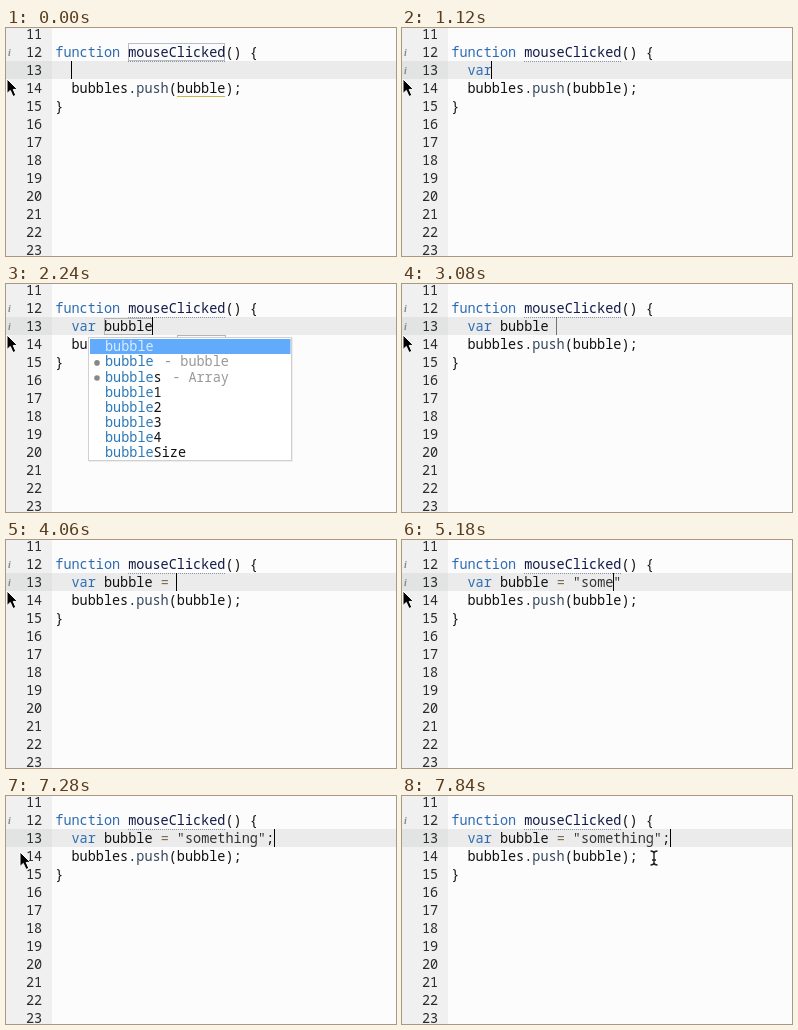
Recreate the animation shown at these times as an HTML page. Size 390 by 228 pixels, loop 8000 ms.

```html
<!DOCTYPE html>
<html lang="en">
<head>
<meta charset="utf-8">
<title>Typing in a code editor</title>
<style>
html, body { margin: 0; width: 100%; height: 100%; overflow: hidden; background: #fcfcfc; }
svg { display: block; width: 100vw; height: 100vh; }
text { font: 500 13.5px "Noto Sans Mono", "DejaVu Sans Mono", monospace; white-space: pre; }
.info { font: italic bold 10px "Liberation Serif", serif; }
</style>
</head>
<body>
<svg id="stage" viewBox="0 0 390 228"></svg>
<script>
const LOOP = 8000, CHAR = 8.1, LEFT = 49.3, LINE = 18;
const BLUE = '#2d6cb3', INK = '#111', NAVY = '#101a48', SLATE = '#34465a', BROWN = '#806a50';

// [time, changes to the editor state]
const STEPS = [
  [0, { code: '', quote: '', caret: 1, fnBox: true, warn: true, info: false,
        popup: null, wordBox: false, mouse: [1, 51] }],
  [140, { caret: 0 }],
  [560, { caret: 1 }],
  [840, { code: 'v', fnBox: false, warn: false, info: true }],
  [980, { code: 'va' }],
  [1120, { code: 'var' }],
  [1400, { code: 'var b', popup: 'words' }],
  [1540, { code: 'var bu' }],
  [1680, { code: 'var bubb' }],
  [1820, { code: 'var bubbl' }],
  [2100, { code: 'var bubble' }],
  [2240, { popup: 'typed', wordBox: true }],
  [2520, { code: 'var bubble ', popup: null }],
  [2660, { wordBox: false }],
  [3080, { caret: 0.5 }],
  [3220, { caret: 0 }],
  [3500, { code: 'var bubble =', caret: 1 }],
  [3780, { code: 'var bubble = ' }],
  [4480, { code: 'var bubble = "', quote: '"' }],
  [4900, { code: 'var bubble = "s' }],
  [5040, { code: 'var bubble = "so' }],
  [5180, { code: 'var bubble = "some' }],
  [5320, { code: 'var bubble = "someth' }],
  [5460, { code: 'var bubble = "somethin' }],
  [5740, { code: 'var bubble = "something' }],
  [6020, { code: 'var bubble = "something"', quote: '' }],
  [6720, { code: 'var bubble = "something";' }],
  [7000, { info: false }],
  [7280, { mouse: [14, 56] }],
  [7420, { mouse: [80, 70] }],
  [7560, { mouse: [168, 74] }],
  [7700, { mouse: [234, 66] }],
  [7840, { mouse: [252, 62] }]
];

const POPUPS = {
  words: [['bubble'], ['bubble1'], ['bubble2'], ['bubble3'], ['bubble4'], ['bubbleSize'], ['bubbles']],
  typed: [['bubble'], ['bubble', 'bubble'], ['bubbles', 'Array'], ['bubble1'], ['bubble2'],
          ['bubble3'], ['bubble4'], ['bubbleSize']]
};

const col = n => LEFT + n * CHAR;
const baseline = row => 29 + (row - 12) * LINE;
const rect = (x, y, w, h, fill, more = '') =>
  `<rect x="${x}" y="${y}" width="${w}" height="${h}" fill="${fill}" ${more}/>`;
const frame = (x, y, w, h, color) => rect(x, y, w, h, 'none', `stroke="${color}"`);
const dots = (x, y, w) =>
  `<path d="M${x} ${y}h${w}" stroke="#8795a8" stroke-dasharray="1 1"/>`;
const span = (s, fill, more = '') => `<tspan fill="${fill}" ${more}>${s}</tspan>`;
const text = (x, y, body, more = '') => `<text x="${x}" y="${y}" ${more}>${body}</text>`;
const info = row => text(2, baseline(row) - 1, 'i', 'class="info" fill="#888"');

function background() {
  let out = rect(0, 0, 390, 228, '#fcfcfc') + rect(0, 0, 46, 228, '#f0f0f0') +
    rect(46, 33, 344, LINE, '#ebebeb') + rect(0, 33, 46, LINE, '#e2e4e4');
  for (let row = 11; row <= 23; row++)
    out += text(36.2, baseline(row), row, 'text-anchor="end" fill="#2a2a2a"');
  return out + info(12);
}

const fixedCode =
  text(col(0), baseline(12), span('function ', BLUE) + span('mouseClicked', NAVY) + span('() {', INK)) +
  text(col(2), baseline(14), span('bubbles.', INK) + span('push', SLATE) + span('(bubble);', INK)) +
  text(col(0), baseline(15), span('}', INK));

function typedLine({ code, quote }) {
  const [, keyword = '', name, equals = '', string = '', end] =
    /^(var\b)?([^="]*)(= ?)?("[^"]*"?)?(.*)$/.exec(code + quote);
  return text(col(2), baseline(13), span(keyword, BLUE) + span(name, INK) +
    span(equals, BROWN) + span(string, '#333') + span(end, INK));
}

function popup(name, typed) {
  const items = POPUPS[name], height = items.length * 15 + 3;
  let out = rect(83, 54, 204, height + 1, '#000', 'opacity=".06"') +
    rect(82.5, 53.5, 203, height, '#fff', 'stroke="#d0d0d0"') + rect(84, 55, 200.5, 15, '#62aafc');
  items.forEach(([word, meta], i) => {
    const y = 67.3 + i * 15.1, first = i === 0;
    out += text(99, y, span(word.slice(0, typed), first ? '#d8ecff' : '#2b79b8') +
      span(word.slice(typed), first ? '#fff' : INK, first ? 'font-weight="bold"' : ''));
    if (meta) out += `<circle cx="91" cy="${y - 3.5}" r="2.8" fill="#888"/>` +
      text(109.5 + word.length * CHAR, y, '- ' + meta, 'fill="#999" font-weight="400"');
  });
  return out;
}

function pointer([x, y]) {
  const shape = x < 46
    ? '<path d="M0 0V14.5L3.3 11.4 6 17.5 8.8 16.3 6.2 10.4H10.5Z" fill="#000" stroke="#fff"/>'
    : '<path d="M-3.5-7Q0-7 0-4.5Q0-7 3.5-7M0-5V5M-3.5 7Q0 7 0 4.5Q0 7 3.5 7M-2 2H2" ' +
      'fill="none" stroke="#222" stroke-width="1.4"/>';
  return `<g transform="translate(${x} ${y})">${shape}</g>`;
}

function draw(s) {
  const caretX = Math.floor(col(2 + s.code.length)) + 0.5;
  const typed = s.code.length - 4;
  let out = background();
  if (s.info) out += info(13);
  if (s.fnBox) out += frame(122.5, 15.5, 96, 17, '#b8bec8');
  out += dots(122, 33.5, 97) + fixedCode + typedLine(s);
  if (s.warn) out += rect(171, 68, 48, 1, '#cbb945');
  if (s.wordBox) out += frame(98.5, 34.5, 48, 16, '#b5b5b5') + frame(171.5, 51.5, 48, 17, '#b5b5b5');
  else if (s.popup) out += dots(98, 50.5, typed * CHAR);
  out += `<path d="M${caretX} 33v18" stroke="#000" opacity="${s.caret}"/>`;
  if (s.popup) out += popup(s.popup, typed);
  return out + pointer(s.mouse);
}

const stage = document.getElementById('stage');
let shown = -1;

function tick() {
  const time = performance.now() % LOOP;
  const count = STEPS.filter(([at]) => at <= time).length;
  if (count !== shown) {
    shown = count;
    stage.innerHTML = draw(Object.assign({}, ...STEPS.slice(0, count).map(step => step[1])));
  }
  requestAnimationFrame(tick);
}
tick();
</script>
</body>
</html>
```
